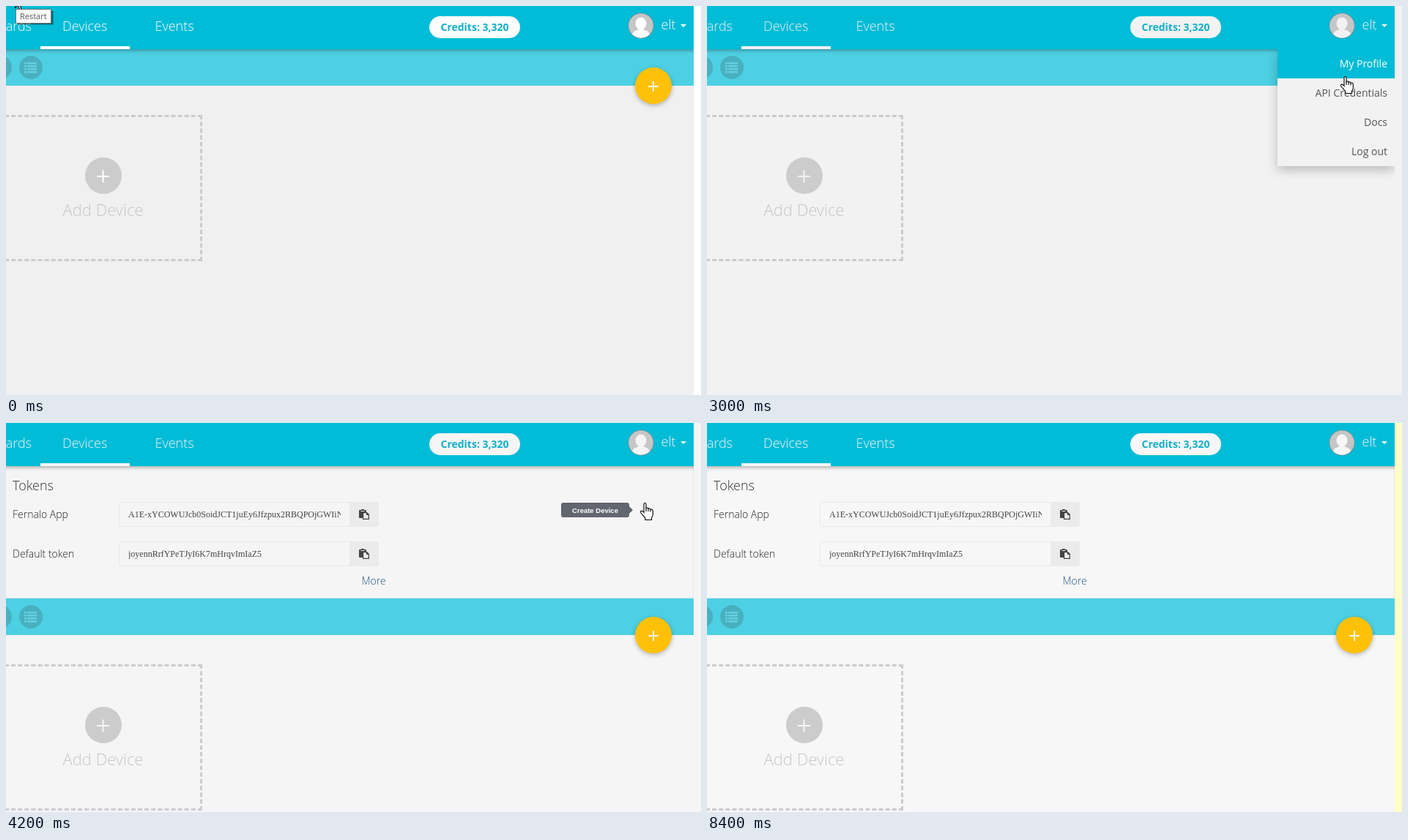
Recreate the animation shown at these times as an HTML page with a canvas. Size 949 px wide and 532 px high, loop 9 s.

```html
<!DOCTYPE html>
<html lang="en">
<head>
<meta charset="utf-8">
<title>Device tokens</title>
<style>
html, body { margin: 0; width: 100%; height: 100%; overflow: hidden; background: #f0f0f0; }
canvas { display: block; }
</style>
</head>
<body>
<canvas id="stage" width="949" height="532"></canvas>
<script>
const ctx = document.getElementById('stage').getContext('2d');
const LOOP = 9000, STEP = 100, EDGE = 939;
const CYAN = '#00bcd7', PALE = '#4dd0e3', GREY = '#cccccc', TIP = '#62666f';
const SANS = '"Open Sans", "Noto Sans", sans-serif';
const SERIF = '"Liberation Serif", "Times New Roman", serif';
const ARIAL = '"Liberation Sans", Arial, sans-serif';
const MENU = ['My Profile', 'API Credentials', 'Docs', 'Log out'];

// time, x, y, shape (0 hidden, 1 arrow, 2 hand)
const PATH = [
  [0, 12, -14, 1], [500, 12, -14, 1], [600, 13, 2, 1], [1500, 593, 50, 1],
  [1900, 850, 30, 1], [2000, 877, 26, 2], [2400, 877, 26, 2],
  [3000, 865, 96, 2], [3100, 865, 96, 2], [3300, 866, 109, 2],
  [4300, 866, 109, 2], [4900, 220, 140, 1], [5300, 478, 180, 2],
  [6400, 478, 180, 2], [6500, 32, 87, 1], [6600, 32, 87, 1], [6700, 0, 0, 0],
  [7000, 12, 0, 1], [7100, 250, 100, 1], [7200, 478, 180, 2], [8000, 478, 180, 2],
  [8100, 330, 130, 1], [8200, 150, 60, 1], [8300, 11, 2, 1], [8400, 0, 0, 0]
];

let white, back;
const within = (t, a, b) => t >= a && t < b;

function rect(x, y, w, h, color) {
  ctx.fillStyle = color;
  ctx.fillRect(x, y, w, h);
}

function round(x, y, w, h, r, color) {
  ctx.fillStyle = color;
  ctx.beginPath();
  ctx.roundRect(x, y, w, h, r);
  ctx.fill();
}

function disc(x, y, r, color) {
  ctx.fillStyle = color;
  ctx.beginPath();
  ctx.arc(x, y, r, 0, Math.PI * 2);
  ctx.fill();
}

function poly(color, ...pts) {
  ctx.fillStyle = color;
  ctx.beginPath();
  for (let i = 0; i < pts.length; i += 2) ctx.lineTo(pts[i], pts[i + 1]);
  ctx.closePath();
  ctx.fill();
}

function text(str, x, y, font, color, align = 'left') {
  ctx.font = font;
  ctx.fillStyle = color;
  ctx.textAlign = align;
  ctx.fillText(str, x, y);
}

function light(str, x, y, size, color, align) {
  text(str, x, y, `300 ${size}px ${SANS}`, color, align);
}

function plus(x, y, arm) {
  rect(x - arm, y - 1, arm * 2, 2, white);
  rect(x - 1, y - arm, 2, arm * 2, white);
}

function shadowed(blur, dy, alpha, draw) {
  ctx.save();
  ctx.shadowColor = `rgba(0,0,0,${alpha})`;
  ctx.shadowBlur = blur;
  ctx.shadowOffsetY = dy;
  draw();
  ctx.restore();
}

function dashes(x1, y1, x2, y2, gap) {
  ctx.strokeStyle = GREY;
  ctx.lineWidth = 3;
  ctx.setLineDash([6, gap]);
  ctx.beginPath();
  ctx.moveTo(x1, y1);
  ctx.lineTo(x2, y2);
  ctx.stroke();
  ctx.setLineDash([]);
}

function page(dy) {
  ctx.save();
  ctx.translate(0, dy);
  rect(0, 59, EDGE, 50, PALE);
  disc(-8, 84, 16, '#48b0bf');
  disc(34, 84, 16, '#48b0bf');
  for (let i = 0; i < 4; i++) {
    rect(25, 77 + i * 4, 3, 2.6, '#66cfdf');
    rect(29, 77 + i * 4, 13, 2.6, '#66cfdf');
  }
  dashes(-2, 150.5, 268, 150.5, 3.1);
  dashes(-2, 347.5, 268, 347.5, 3.1);
  dashes(266.5, 149, 266.5, 349, 3.24);
  disc(133, 232, 25, GREY);
  plus(132.5, 233, 8.5);
  light('Add Device', 132.5, 287, 22, '#c6c6c6', 'center');
  shadowed(6, 2, .28, () => disc(884, 109, 25, '#ffc107'));
  plus(884, 110, 7);
  ctx.restore();
}

function pasteIcon(x, y, ink, paper) {
  round(x, y + 1, 10, 11, 1, ink);
  rect(x + 3, y, 4, 2, ink);
  rect(x + 2.5, y + 2, 5, 1, paper);
  poly(ink, x + 5, y + 4, x + 11, y + 4, x + 14, y + 7, x + 14, y + 14, x + 5, y + 14);
  poly(paper, x + 6.2, y + 5.2, x + 10, y + 5.2, x + 10, y + 8, x + 12.8, y + 8, x + 12.8, y + 12.8, x + 6.2, y + 12.8);
}

function field(label, value, y, hot) {
  light(label, 9, y + 22, 14, '#222');
  round(154, y, 355, 34, 4, '#e9e9e9');
  round(155, y + 1, 314, 32, [3, 0, 0, 3], back);
  round(469, y, 40, 34, [0, 4, 4, 0], hot ? '#b9b9b9' : '#ebebeb');
  ctx.save();
  ctx.beginPath();
  ctx.rect(167, y, 290, 34);
  ctx.clip();
  text(value, 167, y + 21, `12px ${SERIF}`, '#444');
  ctx.restore();
  pasteIcon(482, y + 10, hot ? '#ffffff' : '#444', hot ? '#b9b9b9' : '#ebebeb');
}

function panel(height, shift, hot) {
  ctx.save();
  ctx.beginPath();
  ctx.rect(0, 59, EDGE, height);
  ctx.clip();
  rect(0, 59, EDGE, height, back);
  ctx.translate(0, -shift);
  light('Tokens', 9, 92, 18, '#333');
  field('Fernalo App', 'A1E-xYCOWUJcb0SoidJCT1juEy6Jfzpux2RBQPOjGWIiN', 108, false);
  field('Default token', 'joyennRrfYPeTJyI6K7mHrqvImIaZ5', 162, hot);
  light('More', 485.5, 221, 14, '#1f5a8a');
  ctx.translate(0, shift);
  rect(0, 59 + height - 1, EDGE, 1, '#dedede');
  rect(EDGE - 1, 59, 1, height, '#e8e8e8');
  ctx.restore();
}

function header(hover) {
  ctx.save();
  ctx.beginPath();
  ctx.rect(0, 0, EDGE, 80);
  ctx.clip();
  shadowed(5, 2, .3, () => rect(-20, 0, EDGE + 40, 59, CYAN));
  ctx.restore();
  light('Dashboards', 35, 34, 18, white, 'right');
  light('Devices', 77, 34, 18, white);
  light('Events', 203.5, 34, 18, white);
  rect(47, 55, 122, 4, white);
  round(578, 14, 124, 30, 15, white);
  text('Credits: 3,320', 640, 34, `700 14px ${SANS}`, '#12afc8', 'center');
  avatar(867, 27);
  light('elt', 894.5, 32, 18, white);
  poly(white, 921, 25, 929, 25, 925, 29);
  if (hover) rect(839, 55, 100, 4, '#0097ad');
}

function avatar(x, y) {
  disc(x, y, 17.6, '#6d8f95');
  disc(x, y, 16.8, '#c6c6c6');
  ctx.save();
  ctx.beginPath();
  ctx.arc(x, y, 16.5, 0, Math.PI * 2);
  ctx.clip();
  ctx.fillStyle = white;
  ctx.beginPath();
  ctx.ellipse(x, y - 3, 7.5, 8.5, 0, 0, Math.PI * 2);
  ctx.fill();
  ctx.beginPath();
  ctx.ellipse(x, y + 13, 12, 8, 0, 0, Math.PI * 2);
  ctx.fill();
  rect(x - 3.5, y + 3, 7, 5, white);
  ctx.restore();
}

function menu(row) {
  ctx.save();
  ctx.beginPath();
  ctx.rect(760, 59, EDGE - 760, 190);
  ctx.clip();
  shadowed(14, 5, .24, () => rect(779, 59, 160, 160, white));
  MENU.forEach((item, i) => {
    const y = 59 + i * 40;
    if (i === row) rect(779, y, 160, 40, CYAN);
    text(item, 929, y + 25, `400 14px ${SANS}`, i === row ? '#ffffff' : '#555', 'right');
  });
  ctx.restore();
}

function tip(label, x, y, w, side) {
  round(x, y, w, 20, 3, TIP);
  const base = side < 0 ? x : x + w;
  poly(TIP, base, y + 5, base + side * 5, y + 10, base, y + 15);
  text(label, x + w / 2, y + 13.5, `bold 9.5px ${ARIAL}`, '#ffffff', 'center');
}

function restartTip() {
  rect(16, 7, 49, 19, 'rgba(0,0,0,.22)');
  rect(15, 6, 49, 19, 'rgba(0,0,0,.3)');
  rect(13, 4, 49, 20, '#767676');
  rect(14, 5, 47, 18, '#ffffff');
  text('Restart', 19, 18, `400 11px ${SANS}`, '#575757');
}

const ARROW = new Path2D('M.5 .5V16.5L4.2 13L6.8 19H9.4L6.8 12.5H11.8Z');
const HAND = new Path2D('M5 2Q5 .5 6.5 .5Q8 .5 8 2V7.5Q10.5 6.3 11 8.2Q13.4 7.2 14 9.2Q17 8.5 17.3 11V16Q17.3 18 15.5 20.5V23.5H6.8V20.8L1 14Q-.2 12 1.2 11.2Q2.8 10.6 5 13.4Z');
const FINGERS = new Path2D('M8 7.5V12M11 8.2V12M14 9.2V12.5');

function cursor([x, y, shape]) {
  if (!shape) return;
  const path = shape === 2 ? HAND : ARROW;
  ctx.save();
  ctx.translate(x, y);
  ctx.fillStyle = '#ffffff';
  ctx.strokeStyle = '#000000';
  ctx.lineWidth = 1.1;
  ctx.fill(path);
  ctx.stroke(path);
  if (shape === 2) ctx.stroke(FINGERS);
  ctx.restore();
}

function cursorAt(t) {
  let i = PATH.length - 1;
  while (PATH[i][0] > t) i--;
  const a = PATH[i], b = PATH[i + 1] || a;
  const k = b[3] && b !== a ? (t - a[0]) / (b[0] - a[0]) : 0;
  return [a[1] + (b[1] - a[1]) * k, a[2] + (b[2] - a[2]) * k, a[3]];
}

function shades(t) {
  if (t < 2200) return ['#ffffff', '#f0f0f0'];
  const c = t < 3700 ? '#f2f2f2' : t < 4400 ? '#f5f5f5' : '#f7f7f7';
  return [c, c];
}

function draw(t) {
  [white, back] = shades(t);
  const p = Math.min(1, Math.max(0, (t - 3664) / 400));
  const open = .5 - Math.cos(p * Math.PI) / 2;
  const height = Math.round(181 * open);
  const pointer = cursorAt(t);
  const pressing = within(t, 7200, 8100);
  const yellow = within(t, 1000, 2500) || within(t, 4400, 6700) || t >= 7000;

  rect(0, 0, 949, 532, back);
  page(height);
  if (height) panel(height, Math.round(14 * (1 - open)), within(t, 5300, 6500) || pressing);
  header(within(t, 1900, 2200));
  if (within(t, 2200, 3700)) menu(Math.floor((pointer[1] - 59) / 40));
  rect(EDGE, 0, 10, 532, yellow ? '#ffffc6' : white);
  if (within(t, 3700, 4400)) tip('Create Device', 758, 109, 93, 1);
  if (within(t, 5400, 6700) || pressing) tip('Copy', 517, 169, 53, -1);
  cursor(pointer);
  if (t < 600) restartTip();
}

const start = performance.now();
function tick() {
  const t = (performance.now() - start) % LOOP;
  draw(Math.floor(t / STEP) * STEP);
  requestAnimationFrame(tick);
}
tick();
</script>
</body>
</html>
```
